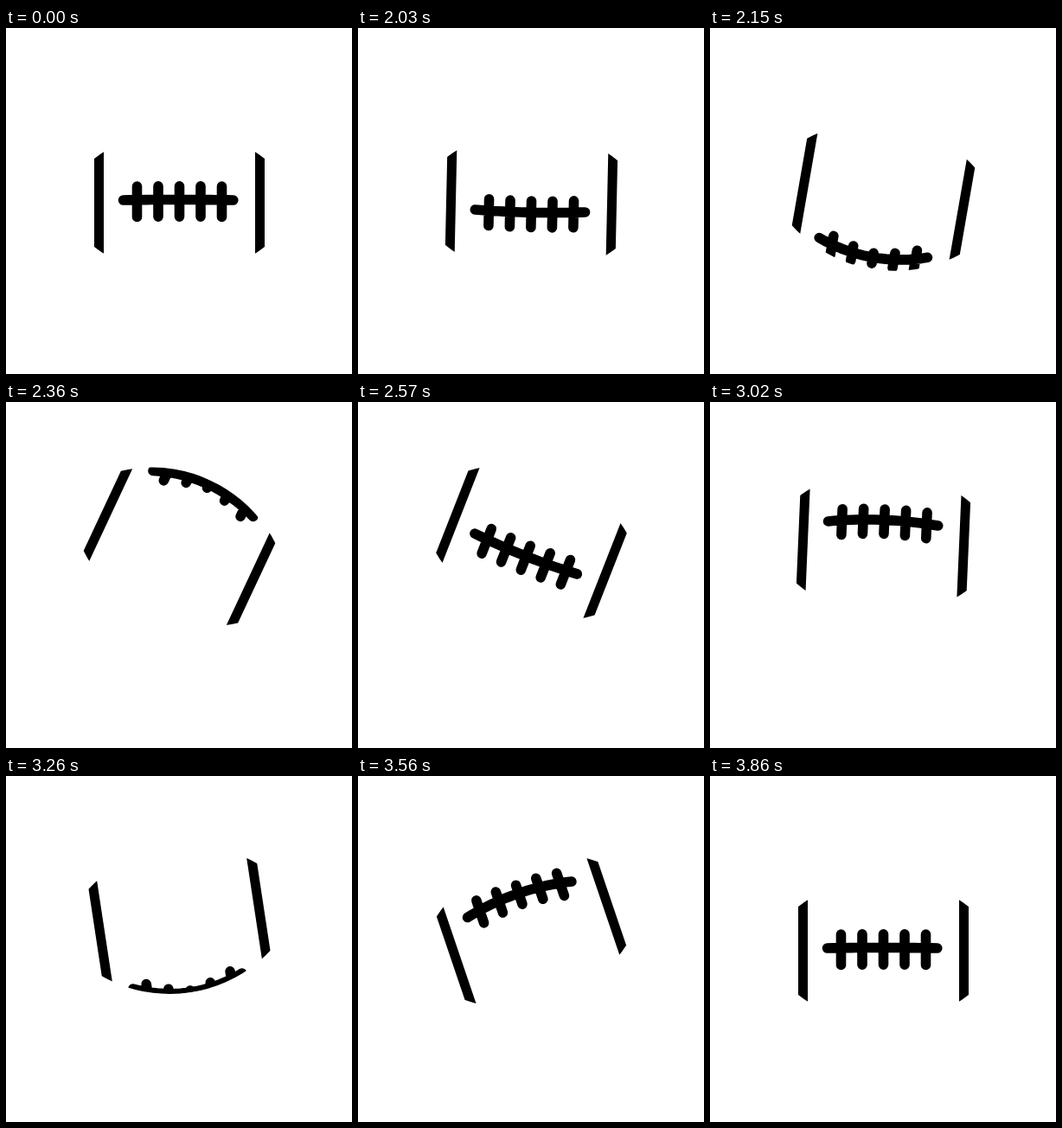
Write an HTML page that moves like this. It is 400 px wide and 400 px high and loops after 3.95 s.

```html
<!DOCTYPE html>
<html lang="en">
<head>
<meta charset="utf-8">
<title>Tossed football</title>
<style>
  html, body { margin: 0; width: 100%; height: 100%; overflow: hidden; background: #fff; }
  svg { display: block; width: 100vw; height: 100vh; }
</style>
</head>
<body>
<svg viewBox="0 0 400 400">
  <defs>
    <clipPath id="hull"><path d="M-141.3 0A160 160 0 0 1 141.3 0A160 160 0 0 1 -141.3 0Z"/></clipPath>
  </defs>
  <g id="ball">
    <g clip-path="url(#hull)" fill="none" stroke="#000" stroke-width="11">
      <path d="M-93 -80V80M93 -80V80"/>
      <path id="laces" stroke-width="11.6" stroke-linecap="round" stroke-linejoin="round"/>
    </g>
  </g>
</svg>
<script>
const LOOP = 3950, START = 2030, END = 3860, STEP = 30;
const REST_Y = 202, RISE = 39, REST_ROLL = -2.4;
const ball = document.getElementById('ball');
const laces = document.getElementById('laces');

const progress = (t, from, to) => Math.min(1, Math.max(0, (t - from) / (to - from)));
const sine = u => (1 - Math.cos(Math.PI * u)) / 2;
const softSine = u => (u + sine(u)) / 2;
const easeOut = u => 1 - (1 - u) ** 2;

// Lean right on the way up, swing over to the left, straighten on landing.
function tilt(t) {
  return 25.4 * sine(progress(t, 1970, 2390))
    - 45.4 * softSine(progress(t, 2410, 3620))
    + 20 * sine(progress(t, 3600, END));
}

// Eased lift, then a free fall.
function height(t) {
  return REST_Y - RISE * (sine(progress(t, START, 2455)) - progress(t, 3020, END) ** 2);
}

// Times at which the laces come over the top edge and leave at the bottom one.
const SWEEPS = [[1793, 2230], [2308, 2774], [2853, 3272]];
const LAST_SWEEP = 3350;

// Roll in degrees, or null while the laces are behind the ball.
function roll(t) {
  if (t >= LAST_SWEEP) {
    return -90 + (90 + REST_ROLL) * easeOut(progress(t, LAST_SWEEP, END));
  }
  const sweep = SWEEPS.find(([from, to]) => t >= from && t <= to);
  return sweep ? -90 + 180 * progress(t, ...sweep) : null;
}

const radius = x => Math.sqrt(160 * 160 - x * x) - 75;

function lacePath(degrees, length) {
  if (degrees === null) return '';
  const angle = degrees * Math.PI / 180;
  const s = Math.sin(angle), c = Math.cos(angle);
  let d = '';
  for (let x = -65; x <= 69; x += 6.7) {
    d += `${d ? 'L' : 'M'}${x.toFixed(1)} ${(radius(x) * s).toFixed(2)}`;
  }
  for (let i = -2; i <= 2; i++) {
    const x = i * 24.5;
    const mid = radius(x) * s + 2 * c;
    const half = length * c * c + (2 + 0.15 * Math.abs(x)) * s * s;
    d += `M${x} ${(mid - half).toFixed(2)}V${(mid + half).toFixed(2)}`;
  }
  return d;
}

function draw(ms) {
  const moving = ms >= START && ms < END;
  const t = moving ? START + Math.floor((ms - START) / STEP) * STEP : END;
  ball.setAttribute('transform', `translate(200.5 ${height(t)}) rotate(${tilt(t)})`);
  laces.setAttribute('d', lacePath(roll(t), moving ? 15.5 : 17.7));
}

let origin = null;
function tick(now) {
  if (origin === null) origin = now;
  draw((now - origin) % LOOP);
  requestAnimationFrame(tick);
}
draw(0);
requestAnimationFrame(tick);
</script>
</body>
</html>
```
